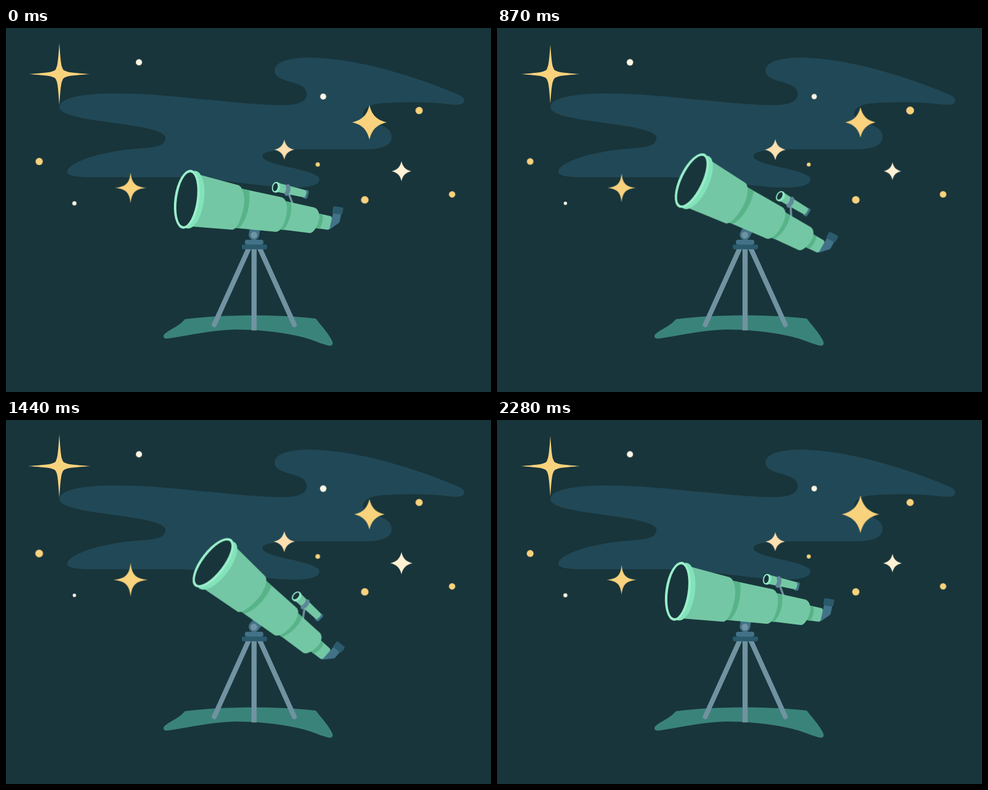
Animation, 800 px wide and 600 px high, one loop 2310 ms. Source, as an HTML page:

```html
<!DOCTYPE html>
<html lang="en">
<head>
<meta charset="utf-8">
<title>Telescope at night</title>
<style>
  html, body { margin: 0; width: 100%; height: 100%; overflow: hidden; background: #18353b; }
  svg { display: block; width: 100vw; height: 100vh; }

  .gold { fill: #f9d27d; }
  .peach { fill: #fde0b0; }
  .cream { fill: #fff1d3; }
  .pale { fill: #fff7e6; }
  .night { fill: #18353b; }
  .tube { fill: #74c7a4; }
  .band { fill: #57b388; }
  .rim { fill: #9aeecb; }
  .lip { fill: #82e3ba; }
  .steel { fill: #427288; }
  .navy { fill: #2b5a6c; }
  .grey { fill: #7193a1; }

  /* --h: half a period, --m: time of the widest point */
  .pulse {
    transform-origin: 0 0;
    animation: pulse var(--h) ease-in-out calc(var(--m) - 3 * var(--h)) infinite alternate;
  }
  @keyframes pulse {
    from { transform: scale(var(--lo)); }
    to { transform: scale(var(--hi)); }
  }
  .fast { --h: 144.375ms; --m: 110ms; }
  .quick { --h: 231ms; --m: 85ms; }
  .even { --h: 288.75ms; --m: 165ms; }
  .slow { --h: 385ms; --m: 320ms; }

  .flare { transform-origin: 0 0; animation: flare 577.5ms linear infinite; }
  @keyframes flare {
    0%, 100% { transform: scale(.285); }
    12%, 24.7%, 94.8% { transform: scale(.312); }
    42.8%, 67.5% { transform: scale(.25); }
    71.4% { transform: scale(.265); }
  }

  .spike { animation: spike 462ms linear infinite; }
  @keyframes spike {
    0%, 100% { transform: scale(1); d: path("M51 0C23-2 14-3 10.5-5Q6-6 5-10.5C3-14 2-23 0-51C-2-23-3-14-5-10.5Q-6-6-10.5-5C-14-3-23-2-51 0C-23 2-14 3-10.5 5Q-6 6-5 10.5C-3 14-2 23 0 51C2 23 3 14 5 10.5Q6 6 10.5 5C14 3 23 2 51 0Z"); }
    28.6% { d: path("M54 0C24-2 14-3 10.5-5Q6-6 5-10.5C3-14 2-24 0-54C-2-24-3-14-5-10.5Q-6-6-10.5-5C-14-3-24-2-54 0C-24 2-14 3-10.5 5Q-6 6-5 10.5C-3 14-2 24 0 54C2 24 3 14 5 10.5Q6 6 10.5 5C14 3 24 2 54 0Z"); }
    55.8% { d: path("M26 0C17-1 14-3 10.5-5Q6-6 5-10.5C3-14 1-17 0-26C-1-17-3-14-5-10.5Q-6-6-10.5-5C-14-3-17-1-26 0C-17 1-14 3-10.5 5Q-6 6-5 10.5C-3 14-1 17 0 26C1 17 3 14 5 10.5Q6 6 10.5 5C14 3 17 1 26 0Z"); }
    84.4% { d: path("M48 0C22-2 14-3 10.5-5Q6-6 5-10.5C3-14 2-22 0-48C-2-22-3-14-5-10.5Q-6-6-10.5-5C-14-3-22-2-48 0C-22 2-14 3-10.5 5Q-6 6-5 10.5C-3 14-2 22 0 48C2 22 3 14 5 10.5Q6 6 10.5 5C14 3 22 2 48 0Z"); }
  }

  .scope { transform-origin: 409px 341px; animation: tilt 2310ms ease-in-out infinite; }
  @keyframes tilt {
    0%, 31.8% { transform: rotate(0deg); }
    43.7% { transform: rotate(35.8deg); }
    53.2%, 71% { transform: rotate(29.6deg); }
    83.6% { transform: rotate(-3.4deg); }
    93.5%, 100% { transform: rotate(0deg); }
  }

  .orbit { transform-origin: 317px 287px; animation: orbit 2310ms linear infinite; }
  @keyframes orbit {
    0%, 42.86% { transform: rotate(0deg); }
    58.5%, 100% { transform: rotate(-104deg); }
  }
  .meteor { fill: #f6bc58; transform-origin: 467px 147px; animation: meteor 2310ms linear infinite; }
  @keyframes meteor {
    0%, 39.6% { transform: scale(0); }
    42.86%, 54.5% { transform: scale(1); }
    58.5%, 100% { transform: scale(0); }
  }
</style>
</head>
<body>
<svg viewBox="0 0 800 600">
  <defs>
    <path id="star" d="M100 0C42-14 14-42 0-100C-14-42-42-14-100 0C-42 14-14 42 0 100C14 42 42 14 100 0Z"/>
    <path id="thin" d="M100 0C30-7 7-30 0-100C-7-30-30-7-100 0C-30 7-7 30 0 100C7 30 30 7 100 0Z"/>
    <circle id="dot" r="1"/>
  </defs>

  <path fill="#214856" d="M88 130C90 112 140 107 185 108C270 108 370 125 450 127C482 128 497 121 496 108C495 85 443 92 443 70C444 52 480 48 510 49C590 52 690 85 749 111C757 115 758 122 752 125C747 128 735 126 725 125C690 121 650 122 620 124C605 125 589 130 589 142C589 150 600 150 610 156C622 162 637 166 636 181C635 196 615 200 590 200H480C450 201 423 202 423 211C424 228 517 232 517 250C516 262 490 263 470 263C420 262 350 248 290 246H140C115 246 100 243 101 236C105 220 160 203 215 199C245 197 263 195 263 181C262 155 88 158 88 130Z"/>

  <g transform="translate(88 76)"><path class="gold spike" d="M51 0L0-51L-51 0L0 51Z"/></g>
  <g transform="translate(599.5 155.5)"><use href="#star" class="gold flare"/></g>
  <g transform="translate(459 200.5)"><use href="#star" class="peach pulse even" style="--lo:.149;--hi:.187"/></g>
  <g transform="translate(652.3 236)"><use href="#star" class="cream pulse quick" style="--lo:.138;--hi:.192;--m:120ms"/></g>
  <g transform="translate(205.5 263.5)"><use href="#thin" class="gold pulse quick" style="--lo:.236;--hi:.298;--m:135ms"/></g>

  <g transform="translate(219.3 56.5)"><use href="#dot" class="pale pulse slow" style="--lo:5.1;--hi:5.8"/></g>
  <g transform="translate(523.2 113)"><use href="#dot" class="pale pulse quick" style="--lo:3.8;--hi:5.4"/></g>
  <g transform="translate(112.8 289)"><use href="#dot" class="pale pulse even" style="--lo:2.7;--hi:3.5;--m:70ms"/></g>
  <g transform="translate(681.4 136)"><use href="#dot" class="gold pulse slow" style="--lo:5.9;--hi:7.5"/></g>
  <g transform="translate(54.7 220)"><use href="#dot" class="gold pulse quick" style="--lo:4.9;--hi:6.4"/></g>
  <g transform="translate(514.2 225)"><use href="#dot" class="gold pulse quick" style="--lo:2.8;--hi:3.9"/></g>
  <g transform="translate(591.8 283.3)"><use href="#dot" class="gold pulse fast" style="--lo:6;--hi:7.4"/></g>
  <g transform="translate(735.8 274.2)"><use href="#dot" class="gold pulse slow" style="--lo:5.2;--hi:5.8"/></g>

  <g class="orbit">
    <path class="meteor" d="M418 106C436 114 456 131 469 144Q470 149 464.500 149C452 137 432 124 411 117A6 6 0 0 1 418 106Z"/>
  </g>

  <path fill="#3a837b" d="M260 507C262 500 285 493 295 480C360 472 450 472 511 479C520 491 532 503 538 516C541 523 536 525 530 523C515 519 500 511 478 507C445 500 410 497 378 497C340 498 300 507 266 512C261 512 259 510 260 507Z"/>

  <g stroke="#7193a1" stroke-width="8" fill="none">
    <path stroke-linecap="round" d="M401 362L343.500 489M418 362L475.500 489"/>
    <path d="M409.200 362V498.500" stroke-width="8.500"/>
  </g>
  <circle class="steel" cx="409" cy="341" r="8.500"/>
  <rect class="navy" x="389" y="357" width="41.500" height="7.700" rx="2"/>
  <rect class="steel" x="394" y="349" width="30.500" height="8" rx="3.500"/>

  <g class="scope">
    <path class="steel" d="M403 325L420 328L417.500 342A8.500 8.500 0 0 1 400.700 339Z"/>
    <circle class="grey" cx="409" cy="341.300" r="5.500"/>

    <path class="steel" d="M540 303L553 306L550.500 319Q550 321 548 322L534 332L533 328L537 316Z"/>
    <rect class="navy" x="538.800" y="294.700" width="17" height="11.800" rx="2.500" transform="rotate(9.500 547.300 300.600)"/>

    <path d="M466 272L474 293" stroke="#7193a1" stroke-width="3.500"/>
    <rect class="steel" x="491" y="267" width="7.500" height="14.500" rx="3" transform="rotate(14 495 274)"/>
    <path class="tube" d="M448 255L493 267Q496 268 495.500 272L494 277Q493 280 490 279L446 270Z"/>
    <path d="M465 261Q467 267 463 273" fill="none" stroke="#5f879a" stroke-width="7" stroke-linecap="round"/>
    <g transform="rotate(12 445 262.500)">
      <ellipse class="lip" cx="446.500" cy="262.500" rx="6" ry="8.800"/>
      <ellipse class="rim" cx="444.500" cy="262.500" rx="5.800" ry="8.800"/>
      <ellipse class="night" cx="444.300" cy="262.500" rx="3.800" ry="6.700"/>
    </g>

    <path class="tube" d="M508 304L535 310Q538 311 537.500 314L534 330Q533 333 530 332.500L505 329Z"/>
    <path class="band" d="M508 304L522 307.500C524 315 521 325 517 331L505 329Z"/>
    <path class="tube" d="M455 284L509 296C515 299 517 305 517 312C515 325 508 338 501 338L445 331Z"/>
    <path class="band" d="M455 284L470 287.500C473 303 467 322 457 333L445 331Z"/>
    <path class="tube" d="M380 263L455 279C460 281 463 286 463.500 298C463 315 455 336 445 336L372 329Z"/>
    <path class="band" d="M380 263L401 267.500C404 290 397 318 384 330.300L372 329Z"/>
    <path class="tube" d="M318 241.500L383 259C389 261 393 270 393 287C391 308 382 332 373 332.500L304 327Z"/>

    <ellipse class="lip" cx="306" cy="283" rx="20.500" ry="48" transform="rotate(8 306 283)"/>
    <g transform="rotate(8 298.300 282.300)">
      <ellipse class="rim" cx="298.300" cy="282.300" rx="20.500" ry="49"/>
      <ellipse class="night" cx="298.300" cy="282.300" rx="16.300" ry="44.800"/>
    </g>
  </g>
</svg>
</body>
</html>
```
